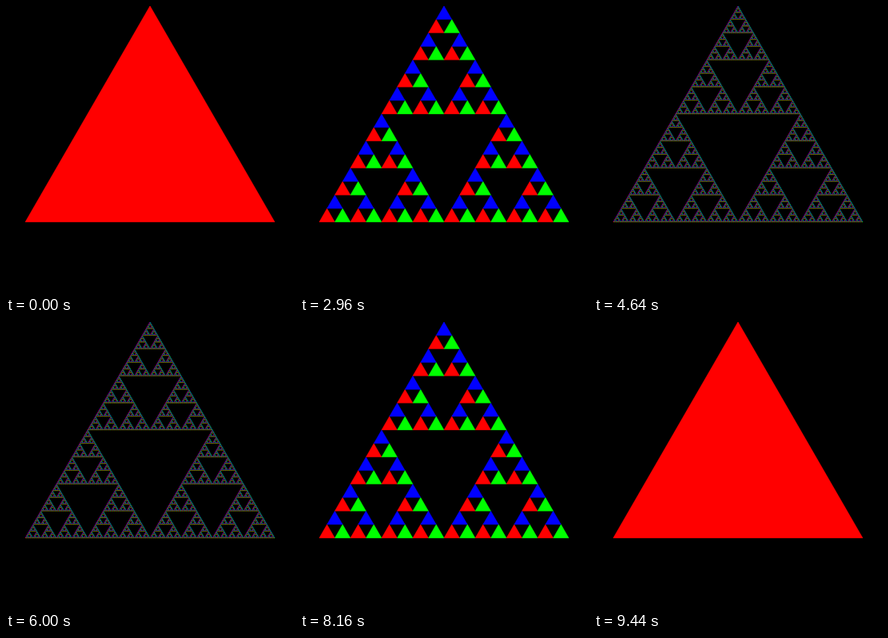
These frames come from a looping animation (360x360 px, 10 s). An HTML page with a canvas:

```html
<!DOCTYPE html>
<html lang="en">
<head>
<meta charset="utf-8">
<title>Sierpinski triangle</title>
<style>
  html, body { margin: 0; width: 100%; height: 100%; overflow: hidden; background: #000; }
  canvas { display: block; width: 360px; height: 360px; }
</style>
</head>
<body>
<canvas id="stage" width="360" height="360"></canvas>
<script>
const LOOP = 10000;
const SIDE = 312;
const RATIO = Math.sqrt(3) / 2;
const RED = '#f00', GREEN = '#0f0', BLUE = '#00f';

// Times at which the depth grows by one, then shrinks by one.
const GROW = [1520, 1920, 2400, 2960, 3360, 3760, 4000, 4240];
const SHRINK = [7200, 7440, 7760, 8080, 8400, 8720, 9040, 9280];

const ctx = document.getElementById('stage').getContext('2d');
// A hairline keeps the smallest triangles visible.
ctx.lineWidth = 0.45;
let shown = -1;

function depthAt(t) {
  const passed = times => times.filter(at => t >= at).length;
  return passed(GROW) - passed(SHRINK);
}

// x, y is the lower left corner.
function triangle(x, y, side, depth, color) {
  const half = side / 2;
  if (depth > 0) {
    triangle(x, y, half, depth - 1, RED);
    triangle(x + half, y, half, depth - 1, GREEN);
    triangle(x + half / 2, y - half * RATIO, half, depth - 1, BLUE);
    return;
  }
  ctx.fillStyle = ctx.strokeStyle = color;
  ctx.beginPath();
  ctx.moveTo(x, y);
  ctx.lineTo(x + side, y);
  ctx.lineTo(x + half, y - side * RATIO);
  ctx.closePath();
  ctx.fill();
  ctx.stroke();
}

function draw(depth) {
  ctx.fillStyle = '#000';
  ctx.fillRect(0, 0, 360, 360);
  triangle(24, 270, SIDE, depth, RED);
}

function tick() {
  const depth = depthAt(performance.now() % LOOP);
  if (depth !== shown) {
    draw(depth);
    shown = depth;
  }
  requestAnimationFrame(tick);
}

tick();
</script>
</body>
</html>
```
